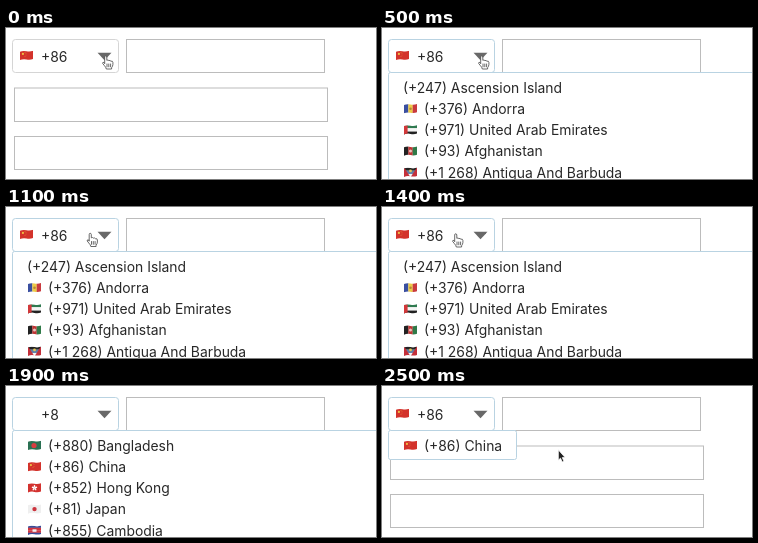
Animation of 370 by 151 pixels, one loop 2600 ms. Source, as an HTML page:

```html
<!DOCTYPE html>
<html lang="en">
<head>
<meta charset="utf-8">
<style>
html, body { margin: 0; width: 100%; height: 100%; overflow: hidden; background: #fff; }
svg { display: block; }
text { font: 13.9px Inter, Roboto, sans-serif; fill: #282828; }
.field { fill: #fff; stroke: #bcbcbc; }
.focus { fill: #fff; stroke: #b9d3e2; }
</style>
</head>
<body>
<svg width="370" height="151" viewBox="0 0 370 151">
  <defs>
    <clipPath id="wave"><path d="M0 1.2Q3 0 6.5 .8T13 .3V8.6Q10 9.8 6.5 9T0 9.6Z"/></clipPath>
  </defs>
  <rect class="field" x="120.5" y="11.5" width="198" height="33"/>
  <rect class="field" x="8.5" y="60" width="313" height="33.5"/>
  <rect class="field" x="8.5" y="108.5" width="313" height="33"/>
  <rect id="picker" x="6.5" y="11.5" width="106" height="33" rx="3"/>
  <g id="chosen" transform="translate(14 22.5)"></g>
  <text id="code" x="35" y="33.6"></text>
  <path id="caret" d="M62 20V37" stroke="#444"/>
  <path d="M91.5 24.8H105.5L98.5 32.3Z" fill="#686868"/>
  <rect id="panel" class="focus" x="6.5" y="44.5" rx="2"/>
  <g id="list"></g>
  <g id="hand" stroke-linejoin="round" stroke-linecap="round" stroke="#444" stroke-width=".8">
    <path fill="#fff" d="M2.2 7.8V1.5Q2.2 .3 3.2 .3T4.3 1.5V4.8Q5.5 4 6.4 5.1Q7.6 4.5 8.4 5.7Q10.3 5.2 10.4 7V9Q10.2 11 9.1 12.2V13.5H3.8Q3.5 11.7 1.8 10L.2 8Q-.2 6.7 1 6.8Z"/>
    <path fill="none" d="M4.5 8.5V11.3M6.3 8.5V11.3M8.1 8.5V11.3"/>
  </g>
  <path id="pointer" d="M176.3 63.8V74.2L178.5 72.2L180.2 76L182 75.2L180.3 71.6H183.2Z" fill="#222" stroke="#fff" stroke-width=".8"/>
</svg>
<script>
const LOOP = 2600;
const $ = id => document.getElementById(id);
const show = (id, on) => $(id).style.display = on ? '' : 'none';

const bar = (x, y, w, h, c) => `<rect x="${x}" y="${y}" width="${w}" height="${h}" fill="${c}"/>`;
const dot = (x, y, r, c) => `<circle cx="${x}" cy="${y}" r="${r}" fill="${c}"/>`;
const rows = (...cs) => cs.map((c, i) => bar(0, i * 10 / cs.length, 13, 10 / cs.length + .1, c)).join('');
const cols = (...cs) => cs.map((c, i) => bar(i * 13 / cs.length, 0, 13 / cs.length + .1, 10, c)).join('');

const flags = {
  ad: cols('#3a4fa0', '#eccb45', '#c93a3f') + dot(6.5, 5, 1.3, '#b98538'),
  ae: rows('#2f7a50', '#f5f5f5', '#222') + bar(0, 0, 3.6, 10, '#d2383a'),
  af: cols('#222', '#c03434', '#2f7a48') + dot(6.5, 5, 1.5, '#e8c4be'),
  ag: rows('#222', '#5f7fa8', '#f5f5f5') + dot(6.5, 3.6, 1.4, '#e8c850') +
      '<path d="M0 0L6.5 10H0ZM13 0L6.5 10H13Z" fill="#c4303a"/>',
  bd: rows('#2a7052') + dot(6, 5, 2.6, '#d83c40'),
  cn: rows('#d3322b') + dot(2.9, 3.4, 1.1, '#eec044') +
      [[5, 1.9], [6, 3], [6, 4.5], [5, 5.7]].map(p => dot(...p, .35, '#eec044')).join(''),
  hk: rows('#d3322f') + [0, 1, 2, 3, 4].map(i =>
      `<ellipse cx="6.5" cy="3.5" rx=".8" ry="1.4" fill="#fff" transform="rotate(${i * 72} 6.5 5)"/>`).join(''),
  jp: rows('#efefef') + dot(6.5, 5, 2.2, '#cc333d'),
  kh: rows('#3a4b96', '#d0353f', '#d0353f', '#3a4b96') + bar(4.5, 4, 4, 2.5, '#f3eeee')
};
const flag = id => id ? `<g clip-path="url(#wave)">${flags[id]}</g>` : '';

const china = ['cn', '(+86) China'];
const lists = {
  all: [['', '(+247) Ascension Island'], ['ad', '(+376) Andorra'],
        ['ae', '(+971) United Arab Emirates'], ['af', '(+93) Afghanistan'],
        ['ag', '(+1 268) Antigua And Barbuda']],
  eight: [['bd', '(+880) Bangladesh'], china, ['hk', '(+852) Hong Kong'],
          ['jp', '(+81) Japan'], ['kh', '(+855) Cambodia']],
  one: [china]
};
const drawList = name => (lists[name] || []).map(([id, label], i) => {
  const y = 64.8 + i * 21.2;
  return `<g transform="translate(22 ${y - 10.3})">${flag(id)}</g><text x="${id ? 42 : 21}" y="${y}">${label}</text>`;
}).join('');

// Hand position: [time, x, y]
const handPath = [[0, 96.5, 27.5], [600, 96.5, 27.5], [800, 91.5, 25.5], [1400, 70.5, 26.5], [LOOP, 70.5, 26.5]];
function handAt(t) {
  const i = handPath.findIndex(p => p[0] > t);
  const [t0, x0, y0] = handPath[i - 1], [t1, x1, y1] = handPath[i];
  const k = (t - t0) / (t1 - t0);
  return [x0 + (x1 - x0) * k, y0 + (y1 - y0) * k];
}

let current;
function setList(name) {
  if (name === current) return;
  current = name;
  const wide = name !== 'one', editing = name === 'eight';
  $('picker').setAttribute('class', name === 'none' ? 'field' : 'focus');
  $('picker').style.stroke = name === 'none' ? '#d5d5d5' : '';
  $('panel').setAttribute('width', wide ? 400 : 128);
  $('panel').setAttribute('height', wide ? 130 : 29);
  show('panel', name !== 'none');
  $('list').innerHTML = drawList(name);
  $('code').textContent = editing ? '+8' : '+86';
  $('chosen').innerHTML = editing ? '' : flag('cn');
}

function frame(now) {
  const t = Math.floor(now % LOOP / 100) * 100;
  setList(t < 200 ? 'none' : t < 1800 ? 'all' : t < 2000 ? 'eight' : 'one');
  show('caret', t >= 1600 && t < 1800 || t >= 2000 && t < 2500);
  show('hand', t < 1700);
  show('pointer', t >= 2500);
  $('hand').setAttribute('transform', `translate(${handAt(t)})`);
  requestAnimationFrame(frame);
}
frame(performance.now());
</script>
</body>
</html>
```
